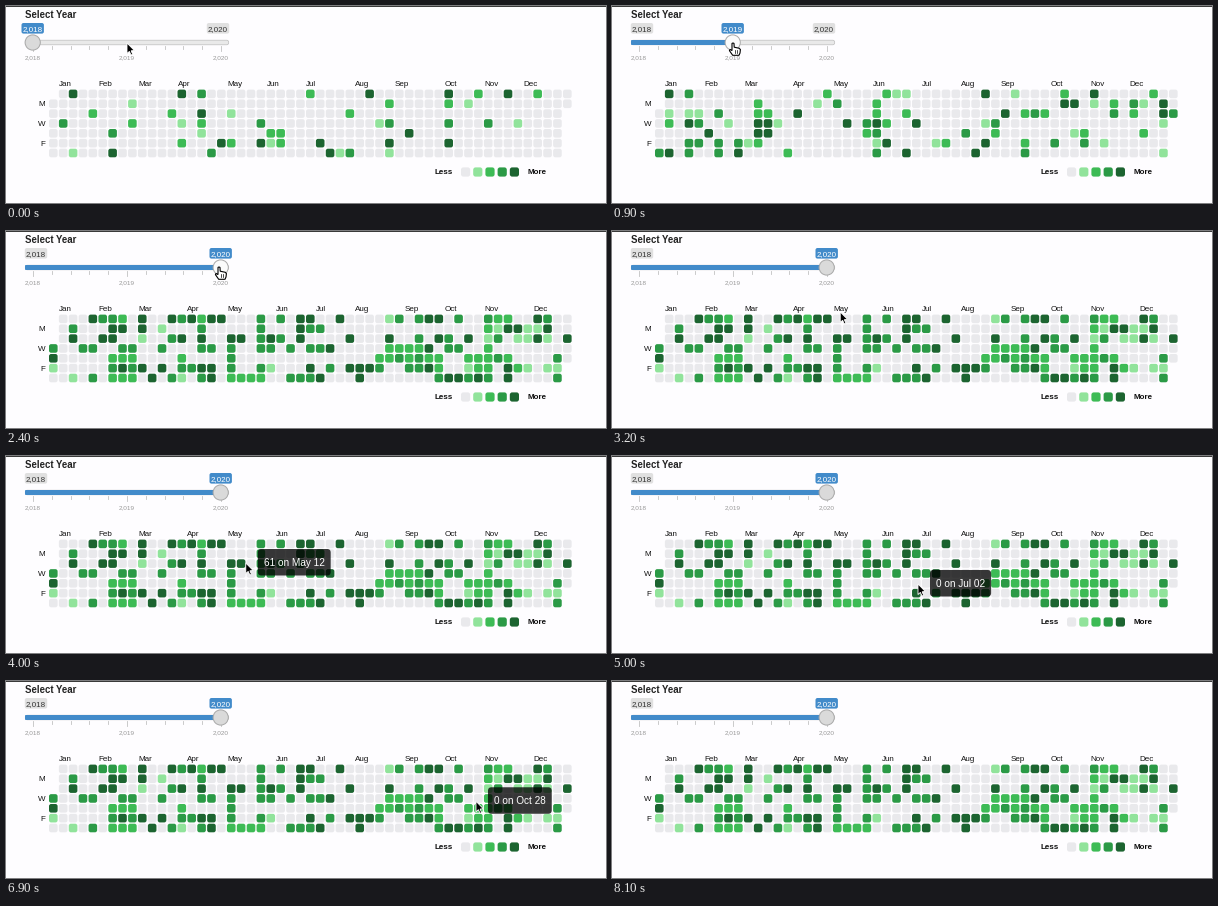
Recreate the animation shown at these times as a matplotlib script. Size 600 px wide and 197 px high, loop 8.2 s.

```python
import random

import matplotlib.pyplot as plt
from matplotlib.animation import FuncAnimation
from matplotlib.collections import PatchCollection
from matplotlib.patches import Circle, FancyBboxPatch, Polygon, Rectangle

plt.rcParams["font.family"] = "Liberation Sans"

WIDTH, HEIGHT, DPI = 600, 197, 100
FRAMES, INTERVAL = 82, 100
LEFT, TOP, PITCH_X, PITCH_Y = 42.4, 83.0, 9.885, 9.85
SHADES = ["#e9e9ec", "#91e39b", "#3dbb55", "#2b9a46", "#1c6430"]
BLUE = "#428bca"
MONTHS = "Jan Feb Mar Apr May Jun Jul Aug Sep Oct Nov Dec".split()
FIRST_WEEKDAY = {2018: 1, 2019: 2, 2020: 3}  # Sunday is 0

# level -> busy weeks, one list per weekday from Sunday
BUSY_2018 = {
    4: [[2, 13, 32, 40, 46], [], [15], [], [36], [17, 21, 27, 34, 40], [6, 28]],
    3: [[15], [], [], [1, 21, 34, 40, 44], [6], [], [16, 30]],
    2: [[26, 43, 49], [34, 40], [4, 12, 30], [8, 15], [22, 23], [13, 18, 23], []],
    1: [[], [8, 42], [18], [13, 33, 47], [15], [22], [2, 29, 34]],
}
BUSY_2019 = {
    4: [[1, 33, 44], [41, 42, 51], [14, 35, 51], [3, 10, 11, 19, 22, 26],
        [5, 10, 11], [23, 33], [1, 8, 25, 32]],
    3: [[3], [18, 48], [6, 38, 46, 52], [4, 21, 34], [22, 31],
        [3, 4, 6, 8, 40, 43], [0, 3, 6, 22, 37]],
    2: [[17, 23, 41, 50], [10, 22, 46], [10, 11, 22, 25, 37, 39, 48], [1, 23],
        [21, 34, 43, 49], [10, 29, 37], [13]],
    1: [[24, 25, 36], [16, 44, 49], [1, 3, 4], [7, 12, 33, 51], [42],
        [9, 22, 28, 45], [51]],
}
BUSY_2020 = {
    4: [[4, 9, 12, 14, 16, 17, 25, 26, 29, 38, 39, 49], [6, 7, 9, 25, 46, 47, 50],
        [2, 5, 6, 13, 15, 18, 19, 22, 25, 30, 34, 39, 42, 49, 52], [28, 38], [0],
        [7, 9, 11, 15, 16, 26, 30, 31, 32, 38, 46], [10, 16, 27, 31, 40, 41, 43, 46]],
    3: [[5, 6, 13, 21, 23, 35, 37, 41, 44, 50], [2, 15, 21, 26, 27],
        [12, 21, 23, 37, 40, 45],
        [0, 3, 4, 7, 8, 11, 15, 16, 18, 21, 22, 24, 26, 27, 40, 41],
        [18, 35, 37, 45, 51], [6, 8, 13, 14, 18, 21, 28, 33, 36, 37],
        [4, 12, 15, 24, 25, 26, 39, 42, 44, 51]],
}
# weekday, first week, last week
LIGHT_RUNS = [(4, 6, 8), (6, 6, 8), (6, 18, 21), (4, 42, 46),
              (3, 34, 37), (4, 33, 38), (5, 43, 44), (0, 45, 46)]


def levels_of(busy):
    return {(week, day): level for level, days in busy.items()
            for day, weeks in enumerate(days) for week in weeks}


def with_light_days(levels, count=26, seed=3):
    rng = random.Random(seed)
    for day, first, last in LIGHT_RUNS:
        for week in range(first, last + 1):
            levels.setdefault((week, day), 2)
    free = [(week, day) for week in range(53) for day in range(7)
            if (week, day) not in levels and not 24 <= week <= 33]
    for cell in rng.sample(free, count):
        levels[cell] = rng.choice((1, 1, 2))
    return levels


def month_lengths(year):
    return [31, 29 if year % 4 == 0 else 28, 31, 30, 31, 30,
            31, 31, 30, 31, 30, 31]


def calendar_of(year):
    """Map (week, weekday) to a date, and find each month's first Sunday."""
    dates, label_weeks = {}, []
    index = FIRST_WEEKDAY[year]
    for name, length in zip(MONTHS, month_lengths(year)):
        label_weeks.append(-(-index // 7))
        for number in range(1, length + 1):
            dates[divmod(index, 7)] = f"{name} {number:02d}"
            index += 1
    return dates, label_weeks


LEVELS = {2018: levels_of(BUSY_2018), 2019: levels_of(BUSY_2019),
          2020: with_light_days(levels_of(BUSY_2020))}
CALENDARS = {year: calendar_of(year) for year in LEVELS}

fig = plt.figure(figsize=(WIDTH / DPI, HEIGHT / DPI), dpi=DPI, facecolor="#fefdff")
ax = fig.add_axes([0, 0, 1, 1])
ax.set(xlim=(0, WIDTH), ylim=(HEIGHT, 0))
ax.axis("off")


def text(x, y, label, size, **style):
    style = {"color": "#111111", "va": "center_baseline", "ha": "left", **style}
    return ax.text(x, y, label, fontsize=size * 72 / DPI, **style)


def box(x, y, w, h, radius, **style):
    style = {"lw": 0, **style}
    return FancyBboxPatch((x, y), w, h, mutation_aspect=1,
                          boxstyle=f"round,pad=0,rounding_size={radius}", **style)


def add_box(*args, **style):
    return ax.add_patch(box(*args, **style))


def slider_x(year):
    return 27 + 94 * (year - 2018)


class Tag:
    """Small rounded value label above the slider."""

    def __init__(self, x, value, fill, color, z):
        self.box = add_box(x - 11.2, 17, 22.4, 10.6, 2, fc=fill, zorder=z)
        self.text = text(x, 22.4, value, 8, color=color, ha="center", zorder=z + 0.1)

    def show(self, visible):
        self.box.set_visible(visible)
        self.text.set_visible(visible)

    def move(self, x, value):
        self.box.set_x(x - 11.2)
        self.text.set_x(x)
        self.text.set_text(value)


# Slider
ax.add_patch(Rectangle((0, 0), WIDTH, 1, fc="#3a3a3a", lw=0))
text(19, 7.5, "Select Year", 9.7, weight="bold", color="#222222")
add_box(19.3, 34.2, 203.4, 4.6, 2, fc="#e9e9e9", ec="#bdbdbd", lw=0.5)
bar = add_box(19, 34, 8, 5, 1, fc=BLUE)
for step in range(11):
    x = 27 + 18.8 * step
    ax.plot([x, x], [40, 45 if step % 5 == 0 else 43], color="#c2c2c2", lw=0.6)
for year in LEVELS:
    text(slider_x(year), 51, f"{year:,}", 6.4, color="#999999", ha="center")
low_tag = Tag(30, "2,018", "#e0e0e0", "#333333", 2)
high_tag = Tag(212, "2,020", "#e0e0e0", "#333333", 2)
value_tag = Tag(27, "2,018", BLUE, "white", 3)
handle = ax.add_patch(Circle((27, 36.5), 7.6, ec="#a8a8a8", lw=0.7, zorder=3))

# Heat map
CELLS = [(week, day) for week in range(53) for day in range(7)]
grid = PatchCollection([box(LEFT + week * PITCH_X + 0.6, TOP + day * PITCH_Y + 0.6,
                            8.6, 8.6, 2.2) for week, day in CELLS], lw=0)
ax.add_collection(grid)
month_texts = [text(0, 77, name, 8) for name in MONTHS]
for day, letter in ((1, "M"), (3, "W"), (5, "F")):
    text(39, TOP + (day + 0.5) * PITCH_Y, letter, 8, ha="right")

# Legend
text(428.5, 166, "Less", 8, weight="bold")
text(521.5, 166, "More", 8, weight="bold")
for i, shade in enumerate(SHADES):
    add_box(455 + 12.2 * i, 161.4, 9.2, 9.2, 2.4, fc=shade)

# Tooltip and pointers
tip_box = add_box(0, 0, 60, 26.5, 3.5, fc="black", alpha=0.77, zorder=5)
tip_text = text(0, 0, "", 10, color="white", zorder=6)

ARROW = [(0, 0), (0, 10.6), (2.4, 8.4), (4, 12), (5.7, 11.3), (4.1, 7.8), (7.4, 7.5)]
HAND = [(-1, 0.4), (0, 0), (1, 0.4), (1.2, 4.2), (6.3, 5.3), (7.4, 6.6), (7, 10),
        (6, 12.3), (-0.3, 12.3), (-3.6, 7.6), (-3, 6.4), (-1, 7.6)]
arrow = ax.add_patch(Polygon(ARROW, fc="black", ec="white", lw=0.6, zorder=8))
hand = ax.add_patch(Polygon(HAND, fc="white", ec="black", lw=0.8, zorder=8))
knuckles = [ax.plot([], [], color="black", lw=0.5, zorder=9)[0] for _ in range(2)]

# seconds, x, y
POINTER_PATH = [(0, 121, 37), (1.2, 121, 37), (1.8, 213, 36), (2.7, 213, 36),
                (3.4, 232, 92), (3.8, 239.8, 107), (4.1, 239.8, 107),
                (4.9, 306, 128), (5.2, 306, 128), (5.9, 332, 114),
                (6.2, 332, 114), (7.2, 508, 122), (8.2, 508, 122)]
POINTER_GONE = 7.6


def pointer_at(t):
    for (t0, x0, y0), (t1, x1, y1) in zip(POINTER_PATH, POINTER_PATH[1:]):
        if t <= t1:
            u = (t - t0) / (t1 - t0)
            u = u * u * (3 - 2 * u)
            return x0 + (x1 - x0) * u, y0 + (y1 - y0) * u


def year_at(t):
    return 2018 if t < 0.45 else 2019 if t < 2.05 else 2020


def draw_calendar(year):
    dates, label_weeks = CALENDARS[year]
    grid.set_facecolor([SHADES[LEVELS[year].get(cell, 0)] if cell in dates else "none"
                        for cell in CELLS])
    for label, week in zip(month_texts, label_weeks):
        label.set_x(LEFT + week * PITCH_X + 0.6)


def draw_slider(year, hovered):
    x = slider_x(year)
    value_tag.move(x - 0.3, f"{year:,}")
    low_tag.show(year > 2018)
    high_tag.show(year < 2020)
    bar.set_width(x - 19)
    bar.set_visible(year > 2018)
    handle.center = (x - 0.3, 36.5)
    handle.set_facecolor("#fbfbfb" if hovered else "#dadada")


def draw_tooltip(year, x, y, present):
    cell = (int((x - LEFT) // PITCH_X), int((y - TOP) // PITCH_Y))
    date = CALENDARS[year][0].get(cell) if present else None
    tip_box.set_visible(date is not None)
    tip_text.set_visible(date is not None)
    if date:
        level = LEVELS[year].get(cell, 0)
        tip_text.set_text(f"{15 * level + 1 if level else 0} on {date}")
        tip_text.set_position((x + 18, y - 1))
        tip_box.set_bounds(x + 12, y - 14, tip_text.get_window_extent().width + 12, 26.5)


def draw_pointer(x, y, hovered, present):
    arrow.set_visible(present and not hovered)
    hand.set_visible(present and hovered)
    arrow.set_xy([(x + dx, y + dy) for dx, dy in ARROW])
    hand.set_xy([(x + dx, y + dy) for dx, dy in HAND])
    for line, dx in zip(knuckles, (2, 4.3)):
        line.set_data([x + dx, x + dx], [y + 6.8, y + 10])
        line.set_visible(present and hovered)


def update(frame):
    t = frame * INTERVAL / 1000
    year = year_at(t)
    x, y = pointer_at(t)
    present = t < POINTER_GONE
    hovered = abs(x - slider_x(year)) < 8 and abs(y - 36.5) < 8
    draw_calendar(year)
    draw_slider(year, hovered)
    draw_tooltip(year, x, y, present)
    draw_pointer(x, y, hovered, present)
    return []


animation = FuncAnimation(fig, update, frames=FRAMES, interval=INTERVAL,
                          repeat=True, repeat_delay=0)
plt.show()
```
